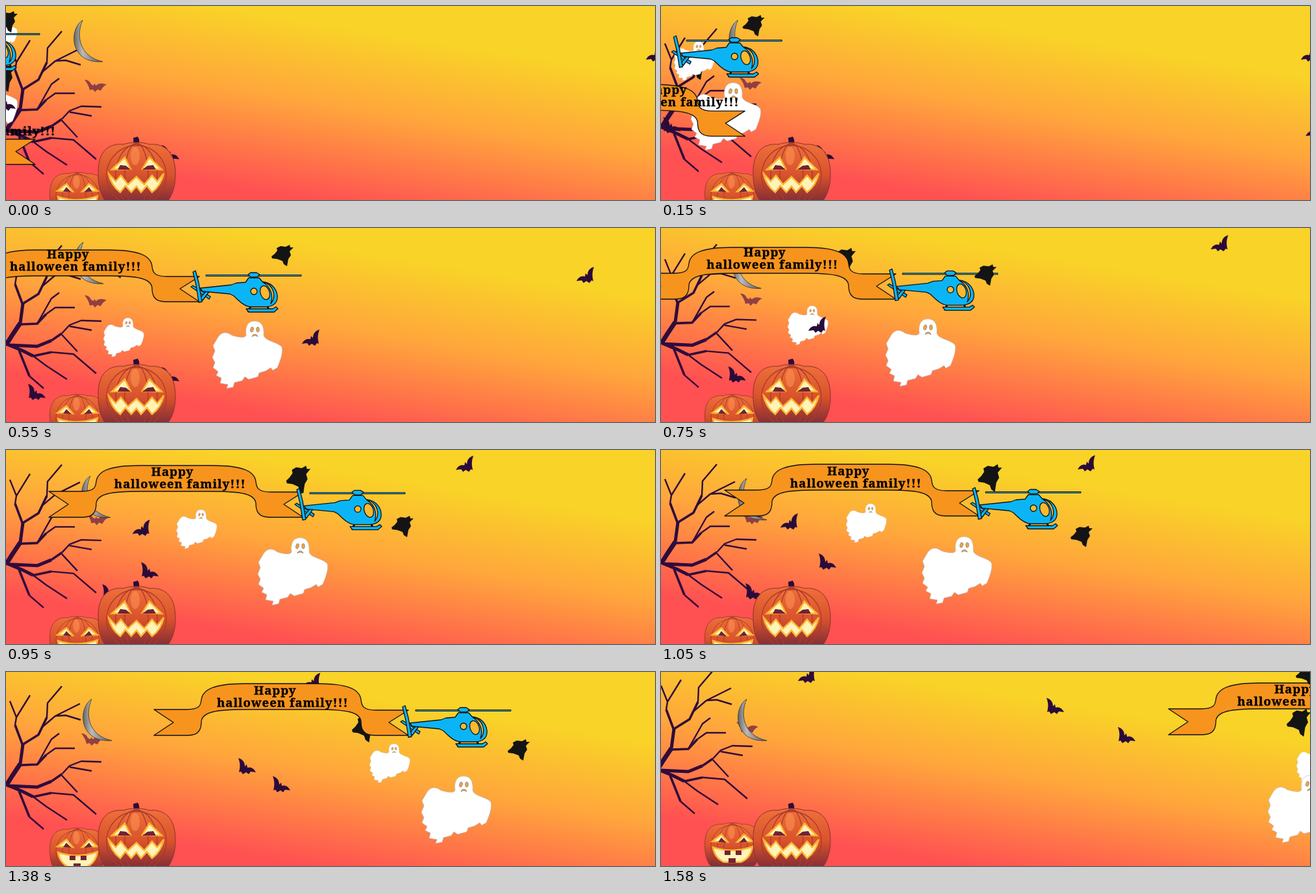
An HTML page for the animation above (1.63 s loop, 1000 by 300 pixels).

```html
<!DOCTYPE html>
<html lang="en">
<head>
<meta charset="utf-8">
<title>Halloween banner</title>
<style>
html, body { margin: 0; width: 100%; height: 100%; overflow: hidden; background: #ffa53c; }
svg { display: block; width: 100%; height: 100%; }
text { font: 900 18.5px "Noto Serif", serif; letter-spacing: 1px; stroke: #000; stroke-width: .4; }
.ink { stroke: #101014; stroke-width: 1.3; stroke-linejoin: round; }
.night { fill: #2b0b3a; }
.tree { fill: none; stroke: #300b3c; stroke-linejoin: round; }
.glow { fill: #fff3b8; stroke: #ffb52e; stroke-width: 2.5; }
.pit { fill: #722333; }
</style>
</head>
<body>
<svg viewBox="0 0 1000 300" preserveAspectRatio="none">
<defs>
  <linearGradient id="sky" gradientUnits="userSpaceOnUse" x1="0" y1="-50" x2="-43" y2="218">
    <stop offset="0" stop-color="#f9d327"/>
    <stop offset=".45" stop-color="#ffa63c"/>
    <stop offset="1" stop-color="#ff5052"/>
  </linearGradient>
  <linearGradient id="rind" x2="0" y2="1">
    <stop offset="0" stop-color="#f0703a"/>
    <stop offset=".5" stop-color="#d8522c"/>
    <stop offset="1" stop-color="#6f2438"/>
  </linearGradient>
  <linearGradient id="silver">
    <stop offset="0" stop-color="#666"/>
    <stop offset=".3" stop-color="#bbb"/>
    <stop offset="1" stop-color="#555"/>
  </linearGradient>
  <path id="bat" class="night" d="M27 0C20 2 17 7 17 13L14 10 13 15C8 13 3 16 0 22L8 21 11 25 15 22 20 25 23 21 26 22C24 14 24 8 27 0Z"/>
  <use id="batRight" href="#bat" transform="matrix(-1 0 0 1 27 0)"/>
  <path id="crow" fill="#141414" d="M0 18L5 14 9 9 8 5 14 2 22 3 28 0 29 4 34 4 28 10 30 16 26 22 24 33 19 30 17 25 9 22 1 21Z"/>
  <g id="ghost">
    <path fill="#fff" stroke="#bbb" stroke-width=".7" d="M52 22C50 8 55 0 65 0 77 0 80 10 79 22 81 31 100 32 107 40 109 48 106 58 100 72L93 76 90 72 82 77 72 80 70 86 56 90 50 86 46 92 34 95 32 102 22 104 24 98 12 96 14 88 6 84 9 78 1 72 4 64 0 56 4 46 1 38 8 26C14 16 22 16 30 22 40 25 50 27 52 22Z"/>
    <g fill="#f5a545" stroke="#777" stroke-width=".7">
      <ellipse cx="61" cy="13" rx="2.3" ry="4" transform="rotate(15 61 13)"/>
      <ellipse cx="70" cy="13" rx="2.3" ry="4"/>
      <path d="M61 24C62 19 69 19 70 24 67 22 64 22 61 24Z"/>
    </g>
  </g>
  <g id="pumpkin">
    <path fill="url(#rind)" stroke="#8a2f30" d="M-59 48C-60 10-40 0-20 2-10-2 10-2 20 2 40 0 60 10 60 48 60 75 50 93 36 100H-36C-50 93-59 75-59 48Z"/>
    <g id="ribs" fill="none" stroke="#a93a2c" stroke-width="1.3"/>
    <ellipse cx="-2" cy="20" rx="7" ry="14" fill="#ff9a58" opacity=".5"/>
  </g>
</defs>

<rect width="1000" height="300" fill="url(#sky)"/>

<g data-path="0:121,113 6:121,103 12:124,95 15:116,94 19:116,76">
  <path fill="#7d2f45" opacity=".85" d="M0 1C5 1 9 4 10 8L14 10 15 7 18 10C22 6 28 6 34 9 28 11 27 15 25 18L20 16 16 20 13 16 8 17C7 11 4 6 0 1Z"/>
</g>

<g class="tree" data-path="0:0,17 6:0,5 12:0,0 15:0,0 19:-6,-24">
  <path stroke-width="7" d="M0 176L10 160 22 142"/>
  <path stroke-width="5" d="M22 142L26 112M0 174L24 184 42 193M5 176L48 178 70 169"/>
  <path stroke-width="3.6" d="M26 112L50 97 63 70M22 144L48 143 62 128M26 114L14 82M42 193L70 187M20 184L36 224M70 169L86 158"/>
  <path stroke-width="2.4" d="M14 82L16 70 6 45M16 70L37 36M63 70L64 48 86 22M56 85L76 68 114 49M76 68L92 67 115 74M62 128L76 118 106 118M48 143L70 104 82 95M86 158L98 145 116 138 147 139M98 147L132 153M86 160L110 186M70 187L104 190 139 220M42 193L62 208 94 229M36 224L58 243"/>
</g>

<g data-path="0:-23,90 6:150,35 12:488,22 15:533,66 19:964,57"><use href="#crow" transform="scale(1.1 1.3)"/></g>
<g data-path="0:0,0 6:1,0 12:14,22 15:14,20">
  <path fill="url(#silver)" stroke="#333" stroke-width=".8" d="M118 22C96 36 98 90 149 86 112 78 108 45 118 22Z"/>
</g>

<g data-path="0:-45,13 6:150,139 12:285,83 15:560,111 19:979,113"><use href="#ghost" transform="scale(.58)"/></g>
<g data-path="0:-90,106 6:318,144 12:402,134 15:640,161 19:935,160"><use href="#ghost"/></g>

<g data-path="4:986,61 6:879,60 8:847,11 12:642,8 19:211,-8"><use href="#bat"/></g>
<g data-path="0:1001,180 4:986,178 6:456,157 8:227,137 12:184,98 15:-40,70"><use href="#bat"/></g>
<g data-path="0:-12,137 6:34,241 12:243,160 15:411,161 19:704,85"><use href="#batRight"/></g>
<g data-path="6:240,215 12:130,206 15:358,133 19:594,40"><use href="#batRight"/></g>

<g data-path="0:-347,165 6:-94,34 12:98,22 15:228,18 19:782,17">
  <path class="ink" fill="#f7941d" d="M0 40H50C72 40 72 32 73 25 75 8 95 0 140 0H252C297 0 317 8 319 25 320 32 320 41 342 41H392L362 60 392 80H340C322 80 319 70 319 58 317 44 297 40 252 40H140C95 40 75 44 73 58 73 70 70 80 52 80H0L30 60Z"/>
</g>
<g data-path="0:-126,200 6:6,66 12:199,58 15:325,54 19:888,52">
  <text x="57" y="-19">Happy</text>
  <text>halloween family!!!</text>
</g>

<g class="ink" fill="#0bb5f5" data-path="0:-118,37 6:285,67 12:477,59 15:608,53 19:1162,51">
  <path d="M0 24L3 22 30 39 28 43Z"/>
  <path d="M14 41L26 28 29 30 18 45Z"/>
  <path d="M3 1L7 -1 12 18 17 47 12 48 8 22Z"/>
  <path d="M92 54L88 63M118 54L121 63" stroke-width="3"/>
  <path d="M14 26L62 21 70 18 84 17 89 10H105L110 16C128 18 134 32 133 42 132 50 126 54 116 55H92C82 54 74 46 66 38L60 35 18 31Z"/>
  <path d="M85 58H126L131 55 134 58 128 63H89Z"/>
  <rect x="23" y="5.5" width="147" height="2" stroke-width="1"/>
  <path d="M88 5L92 2H101L106 5 102 9H92Z"/>
  <g fill="#fbb92f">
    <circle cx="97" cy="31" r="5"/>
    <ellipse cx="114" cy="33" rx="7" ry="11" transform="rotate(-18 114 33)"/>
    <path d="M111 17C128 20 132 40 123 50 127 38 124 25 111 17Z"/>
  </g>
</g>
<g data-path="0:-16,8 6:409,26 12:631,117 15:773,104 19:978,-12"><use href="#crow"/></g>

<g data-path="12:110,258 15:110,242 19:110,234">
  <use href="#pumpkin" transform="scale(.72)"/>
  <path class="glow" d="M-31 28L-17 17 -7 29ZM7 29L18 17 31 28ZM-30 37Q0 47 31 36 28 54 13 60H-13Q-27 54-30 37Z"/>
  <path class="pit" d="M-22 29L-17 22 -9 30ZM10 30L18 22 23 29ZM-12 42H-3V49H-12ZM5 42H14V49H5ZM-6 54H5V61H-6Z"/>
</g>
<g transform="translate(201 212)">
  <path class="night" d="M-4 4L-5 -8 2 -10 4 -6 5 4Z"/>
  <use href="#pumpkin"/>
  <path class="glow" d="M-38 41L-18 22 -9 40ZM9 40L20 22 39 41ZM-43 47L-32 59 -24 50 -13 64 0 52 12 64 24 50 32 59 42 47Q38 66 24 76L16 66 7 76 0 67 -8 76 -17 66 -25 76Q-39 66-43 47Z"/>
  <path class="pit" d="M-29 41L-25 34 -16 35 -9 41ZM9 41L17 35 26 34 30 41Z"/>
</g>
</svg>

<script>
// Runs of equal holds: [length in ms, how many].
const holds = [[50, 1], [100, 8], [50, 2], [100, 3], [130, 1], [50, 5]]
  .flatMap(([length, count]) => Array(count).fill(length));
const LOOP = holds.reduce((sum, length) => sum + length);

for (let rx = 18; rx < 60; rx += 14) {
  const rib = document.createElementNS('http://www.w3.org/2000/svg', 'ellipse');
  rib.setAttribute('cy', 50);
  rib.setAttribute('rx', rx);
  rib.setAttribute('ry', 52 - rx / 8);
  document.getElementById('ribs').append(rib);
}

// Each path lists its turning points as tick:x,y.
const movers = [...document.querySelectorAll('[data-path]')].map(el => ({
  el,
  turns: el.dataset.path.split(' ').map(turn => turn.split(/[:,]/).map(Number))
}));

function position(turns, tick) {
  const next = turns.findIndex(([at]) => at >= tick);
  const to = turns.at(next);
  const from = turns[Math.max(0, next - 1)];
  if (next < 1) return to.slice(1);
  const part = (tick - from[0]) / (to[0] - from[0]);
  return [1, 2].map(axis => from[axis] + (to[axis] - from[axis]) * part);
}

function tickAt(time) {
  let tick = 0;
  while (time >= holds[tick]) time -= holds[tick++];
  return tick;
}

const begin = performance.now();
function draw() {
  const tick = tickAt((performance.now() - begin) % LOOP);
  for (const { el, turns } of movers) {
    el.setAttribute('transform', `translate(${position(turns, tick)})`);
  }
  requestAnimationFrame(draw);
}
draw();
</script>
</body>
</html>
```
